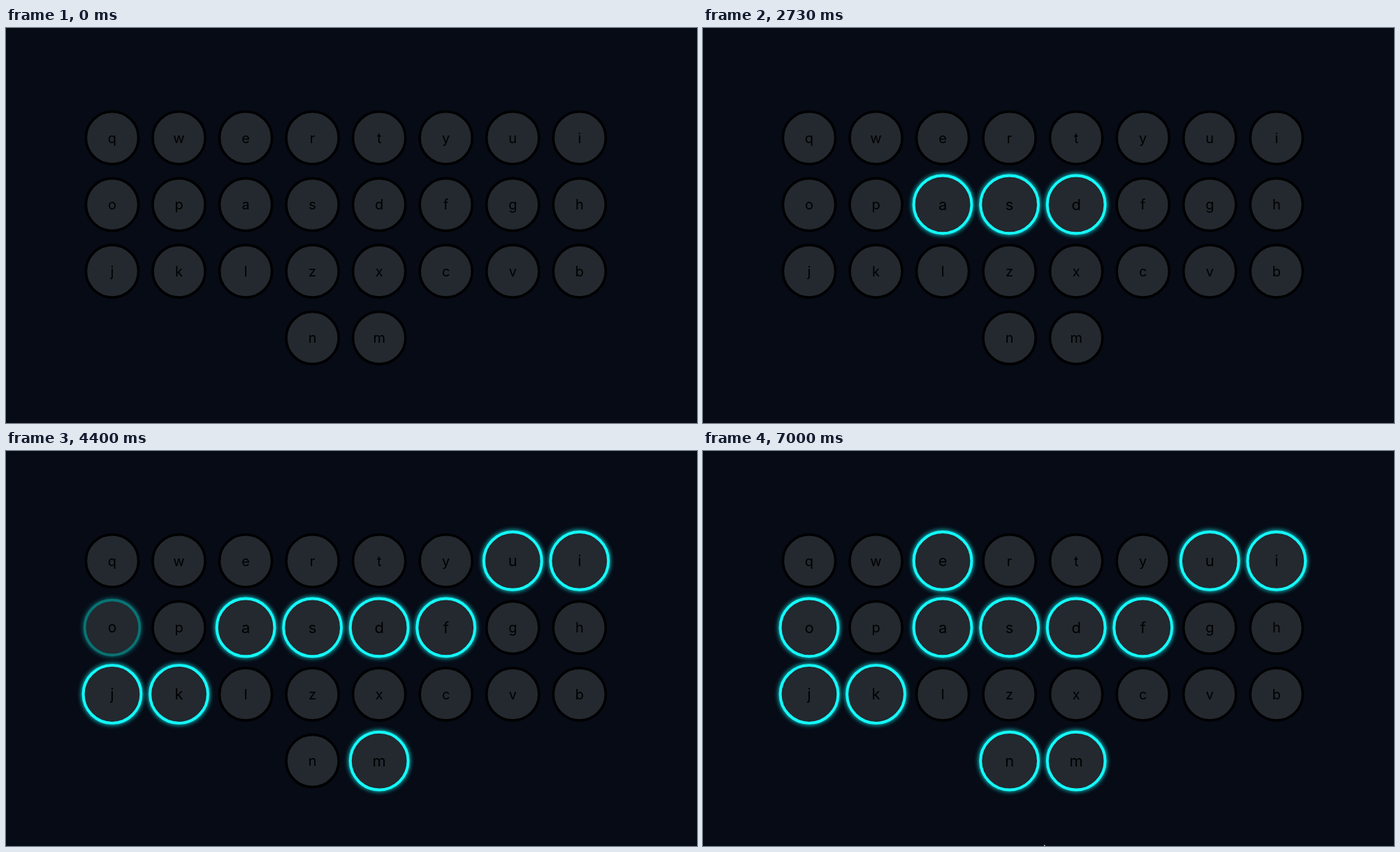
Write an HTML page that moves like this. It is 989 by 566 pixels and loops after 7070 ms.

```html
<!DOCTYPE html>
<html lang="en">
<head>
<meta charset="utf-8">
<style>
  html, body { margin: 0; width: 100%; height: 100%; overflow: hidden; background: #060b16; }
  svg { display: block; width: 989px; height: 566px; }
  text { font: 20px Inter, sans-serif; text-anchor: middle; }
  .glow { fill: #14fcfc; filter: blur(3.5px); }
  .ring { fill: #23292f; stroke-width: 3.6px; }
</style>
</head>
<body>
<svg id="stage" viewBox="0 0 989 566"></svg>
<script>
const LOOP = 7070, STEP = 1000 / 15, FADE = 70;
const ROWS = ["qwertyui", "opasdfgh", "jklzxcvb", "nm"];
const PITCH = 95.55, CENTER_X = 486.4, TOP_Y = 157.4;
// time at which each key starts to light up
const pressed = { a: 1168, s: 1435, d: 2435, f: 2968, k: 3435, m: 3635,
                  i: 3968, j: 4101, u: 4235, o: 4368, e: 4501, n: 4901 };
// pointer keyframes: time, x, y
const pointerPath = [[66, 426, 550], [200, 322, 504], [333, 340, 519], [400, 340, 519], [600, 68, 519]];

const stage = document.getElementById("stage");

function add(markup) {
  stage.insertAdjacentHTML("beforeend", markup);
  return stage.lastElementChild;
}

const keys = ROWS.flatMap((row, r) => [...row].map((letter, c) => {
  const el = add(`<g><circle class="glow" r="39.4"/><circle class="ring" r="37.6"/><text y="7.2">${letter}</text></g>`);
  return {
    el, start: pressed[letter] ?? Infinity,
    glow: el.querySelector(".glow"), ring: el.querySelector(".ring"),
    x: CENTER_X + (c - (row.length - 1) / 2) * PITCH,
    y: TOP_Y + r * PITCH
  };
}));

const pointer = add('<path d="M.5 .5V13L3.6 10.3 5.6 14.5 7.4 13.6 5.6 9.7H9.8Z" stroke="#ddd" stroke-width=".8"/>');

const clamp = v => Math.min(1, Math.max(0, v));

function pointerAt(t) {
  if (t > 6980) return [488, 564];
  const i = pointerPath.findIndex(([time], n) => n && t <= time + 1);
  if (t < 66 || i < 0) return null;
  const [t0, x0, y0] = pointerPath[i - 1], [t1, x1, y1] = pointerPath[i];
  const p = clamp((t - t0) / (t1 - t0));
  return [x0 + (x1 - x0) * p, y0 + (y1 - y0) * p];
}

function draw(now) {
  // the motion is stepped at 15 pictures per second
  const t = Math.floor((now % LOOP + 5) / STEP) * STEP;
  for (const { el, glow, ring, x, y, start } of keys) {
    const p = clamp((t - start) / FADE);
    el.setAttribute("transform", `translate(${x} ${y}) scale(${1 + p * 0.1})`);
    glow.style.display = p ? "" : "none";
    glow.style.opacity = p;
    ring.style.stroke = `rgb(${20 * p}, ${252 * p}, ${252 * p})`;
  }
  const spot = pointerAt(t);
  pointer.style.display = spot ? "" : "none";
  if (spot) pointer.setAttribute("transform", `translate(${spot})`);
}

const begin = performance.now();
function tick() {
  draw(performance.now() - begin);
  requestAnimationFrame(tick);
}
tick();
</script>
</body>
</html>
```
